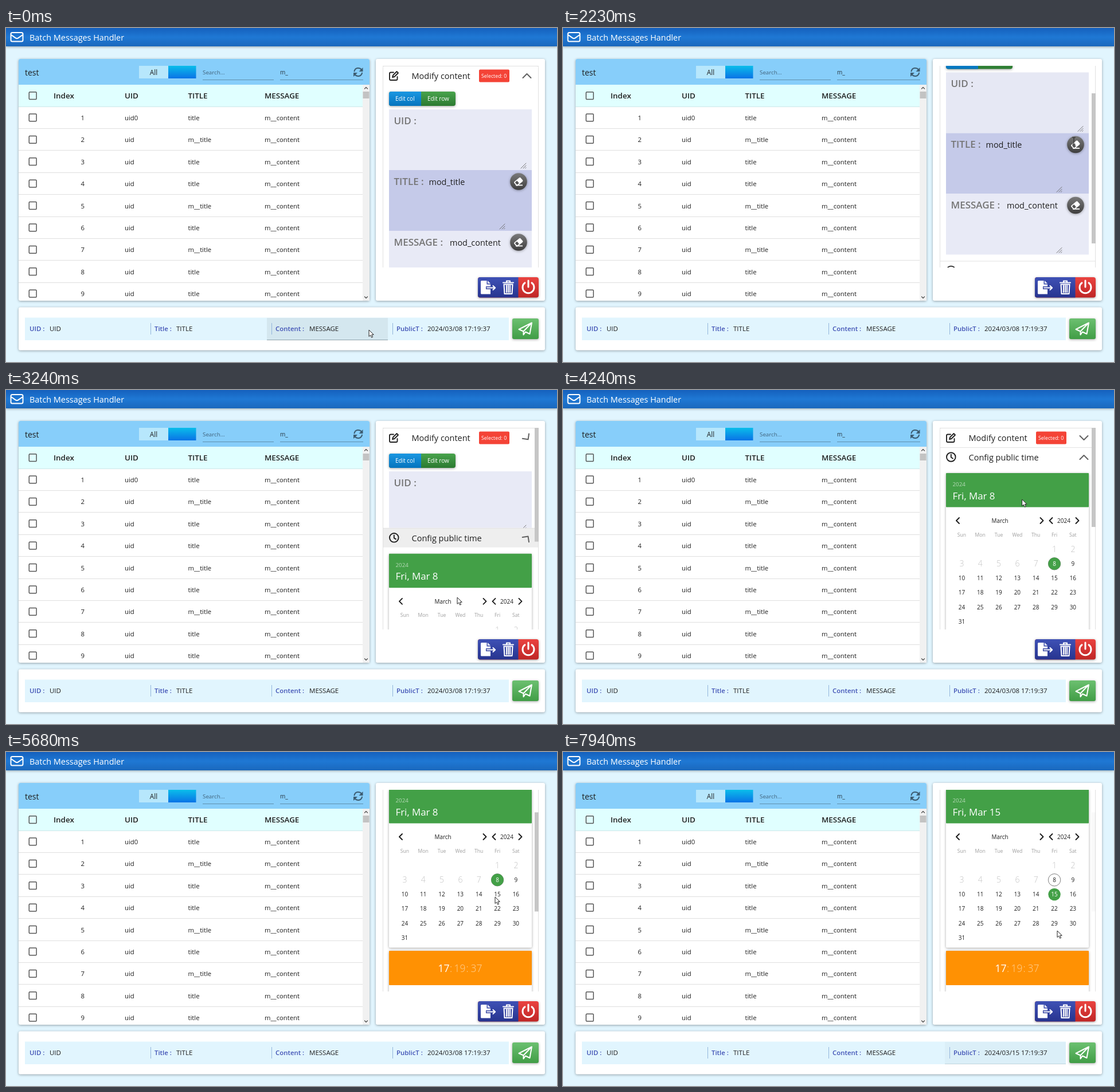
Animation, 961 px wide and 583 px high, one loop 8000 ms. Source, as an HTML page:

```html
<!DOCTYPE html>
<html lang="en">
<head>
<meta charset="utf-8">
<title>Batch Messages Handler</title>
<style>
  html, body { margin: 0; width: 100%; height: 100%; overflow: hidden; background: #e1f5fe; }
  svg { display: block; width: 100%; height: 100%; font-family: "Open Sans", "Noto Sans", sans-serif; }
  text { white-space: pre; }
  .card { filter: drop-shadow(0 1px 2px rgba(0, 0, 0, .35)); }
  .line { fill: none; stroke-linecap: round; stroke-linejoin: round; }
</style>
</head>
<body>
<svg id="stage" viewBox="0 0 961 583"></svg>
<script>
const LOOP = 8000, OPEN_AT = 3120, PICK_AT = 6300;
const MOD_H = 371, CFG_H = 614, VIEW_H = 352;

// --- markup helpers ---
const rect = (x, y, w, h, fill, more = '') =>
  `<rect x="${x}" y="${y}" width="${w}" height="${h}" fill="${fill}" ${more}/>`;
const text = (x, y, s, size, fill = '#1f1f1f', more = '') =>
  `<text x="${x}" y="${y}" font-size="${size}" fill="${fill}" ${more}>${s}</text>`;
const line = (d, stroke, w = 1, more = '') =>
  `<path class="line" d="${d}" stroke="${stroke}" stroke-width="${w}" ${more}/>`;
const group = (more, ...parts) => `<g ${more}>${parts.join('')}</g>`;
const grad = (id, ...cols) => `<linearGradient id="${id}" x2="0" y2="1">${cols.map((c, i) =>
  `<stop offset="${i / (cols.length - 1)}" stop-color="${c}"/>`).join('')}</linearGradient>`;
const clip = (id, x, y, w, h) =>
  `<clipPath id="${id}">${rect(x, y, w, h, '#000', `id="${id}Box"`)}</clipPath>`;
const MID = 'text-anchor="middle"', SEMI = 'font-weight="600"';

const defs = '<defs>' +
  grad('bar', '#1560bd', '#1f78d4', '#1a68bd') + grad('cyan', '#0abdea', '#0a73e6') +
  grad('blue', '#1a97e2', '#0574bd') + grad('green', '#48a34c', '#2c7a31') +
  grad('send', '#6cc070', '#419d46') + grad('indigo', '#3f51b5', '#27348f') +
  grad('red', '#ea4340', '#bf2626') + grad('grey', '#7a7a7a', '#3e3e3e') +
  clip('view', 657, 66, 273, VIEW_H) + clip('modClip', 657, 100, 273, MOD_H) +
  clip('cfgClip', 657, 134, 273, 0) + '</defs>';

// --- top bar ---
const topBar = group('class="card"', rect(0, 0, 961, 32, 'url(#bar)')) +
  line('M11 8H27Q29.5 8 29.5 10.5V21Q29.5 23.5 27 23.5H11Q8.500 23.500 8.500 21V10.500Q8.500 8 11 8ZM9 12L17 17.600Q19 18.800 21 17.600L29 12', '#fff', 2) +
  text(41, 21.5, 'Batch Messages Handler', 14.4, '#fff');

// --- table ---
const checkbox = y => rect(40.3, y - 6.3, 12.8, 12.8, 'none', 'rx="1.2" stroke="#555" stroke-width="1.5"');
const row = (_, i) => {
  const y = 161 + 38.4 * i, n = i + 1;
  return checkbox(y - 4.7) + text(133.8, y, n, 11.3, '#1f1f1f', MID) +
    text(207, y, i ? 'uid' : 'uid0', 11.3) +
    text(317.5, y, [2, 5, 7].includes(n) ? 'm__title' : 'title', 11.3) +
    text(451, y, 'm__content', 11.3) +
    (i < 8 ? rect(22, Math.round(y + 14), 600, 1, '#dfdfdf') : '');
};
const heads = [[83, 'Index'], [207, 'UID'], [317.5, 'TITLE'], [451, 'MESSAGE']];
const table = group('class="card"', rect(22, 54, 612, 422, '#fff', 'rx="3"')) +
  `<path d="M22 99V57Q22 54 25 54H631Q634 54 634 57V99Z" fill="#87cefa"/>` +
  text(33, 83, 'test', 14) +
  rect(232, 66, 51, 22, '#b7e7fc') + text(257.5, 81.5, 'All', 11.8, '#1f1f1f', MID) +
  rect(283, 66, 48.5, 22, 'url(#cyan)') +
  text(343, 81, 'Search...', 9.8, '#41647c') + text(478, 81, 'm_', 10, '#26333c') +
  rect(343, 90, 124, 1, '#5f90ae') + rect(478, 90, 145, 1, '#5f90ae') +
  line('M607.500 75.500A7 7 0 0 1 620 72.800M621 78.500A7 7 0 0 1 608.500 81.200', '#3d5d72', 2) +
  `<path d="M622.500 69V76H615.500ZM606 85V78H613Z" fill="#3d5d72"/>` +
  rect(22, 99, 600, 38, '#e0ffff') + rect(22, 137, 600, 1, '#cfe6e8') +
  checkbox(118) + heads.map(([x, s]) => text(x, 123.3, s, 13.4, '#1f1f1f', SEMI)).join('') +
  Array.from({ length: 9 }, row).join('') +
  rect(622, 99, 12, 377, '#f1f1f1') + rect(622.5, 111, 11, 12, '#c3c3c3') +
  line('M625.500 106L628 103.500L630.500 106M625.500 469L628 471.500L630.500 469', '#505050', 1.3);

// --- bottom form ---
const fields = [[41, 'UID :', 76, 'UID'], [259, 'Title :', 297, 'TITLE'],
  [470, 'Content :', 529, 'MESSAGE'], [681, 'PublicT :', 735, '']];
const hoverField = (id, x, w) => group(`id="${id}"`,
  rect(x, 506, w, 39, '#000', 'opacity=".06"'), rect(x, 544, w, 1, '#8fa3ad'));
const form = group('class="card"', rect(22, 487.5, 918, 75, '#fff', 'rx="3"')) +
  rect(33, 505.500, 844, 39.500, '#e1f5fe') +
  hoverField('contentHover', 455, 211) + hoverField('timeHover', 666, 211) +
  fields.map(([x, label, vx, v], i) =>
    (i ? rect(x - 7, 515, 1, 20, '#93b6dc') : '') +
    text(x, 529, label, 11.4, '#3f51b5', SEMI) +
    text(vx, 529, v, 11.5, '#1f1f1f', i == 3 ? 'id="stamp"' : '')).join('') +
  group('class="card"', rect(883, 507, 46, 36, 'url(#send)', 'rx="3"')) +
  line('M894.500 526L917 514.500L913.500 534L906 530.500L902.500 535.500V529.500ZM902.500 529.500L916.500 515', '#fff', 2);

// --- right side ---
const chevron = (id, y) => group(`id="${id}"`, line(`M901.500 ${y - 3.500}L908.500 ${y + 3.500}L915.500 ${y - 3.500}`, '#606060', 2));
const header = (id, y, label, icon) =>
  rect(657, y, 272, 34, '#fff') + rect(657, y, 272, 34, '#000', `id="${id}Hover" opacity="0"`) +
  rect(657, y, 272, 1, '#e2e2e2') + icon + text(707.5, y + 23.3, label, 14.5) + chevron(id + 'Arrow', y + 17.5);

const grip = (x, y) => line(`M${x - 5} ${y + 4}L${x + 4} ${y - 5}M${x - 1} ${y + 4}L${x + 4} ${y - 1}M${x + 2.500} ${y + 4}L${x + 4} ${y + 2.500}`, '#666', .9);
const eraser = y => group('class="card"', `<circle cx="894" cy="${y}" r="14.800" fill="url(#grey)"/>`) +
  group(`transform="translate(894 ${y}) rotate(-40)"`, rect(-7.5, -4.5, 14.5, 9, '#fff', 'rx="1.8"'),
    rect(-5.8, -2.8, 4.7, 5.6, '#555', 'rx=".8"')) + rect(889, y + 5.5, 12, 1.8, '#fff');
const area = (y, fill, id, label, gx, vx, v) => rect(668, y, 249, 106, fill) +
  rect(668, y, 249, 106, '#333300', `id="${id}" opacity="0"`) +
  text(676.5, y + 26, label, 17, '#757575', SEMI) + grip(gx, y + 99) +
  (v ? text(vx, y + 25.7, v, 14.4) + eraser(y + 20) : '');

const editIcon = line('M676 77.500H671Q669 77.500 669 79.500V89Q669 91 671 91H680.500Q682.500 91 682.500 89V85M674 86L675 82.500L681.500 76L684 78.500L677.500 85Z', '#222', 1.9);
const clockIcon = line('M669 117a7.800 7.800 0 1 0 15.600 0a7.800 7.800 0 1 0 -15.600 0M676.800 112.500V117.500L680 119.500', '#1c1c1c', 1.9);
const tagIcon = '<path d="M668.500 111H675L682 118L676 124L668.500 117Z" fill="#1c1c1c"/><circle cx="671.500" cy="113.800" r="1.200" fill="#fff"/>' +
  line('M679 111.500L685 117.800L680 123.500', '#1c1c1c', 1.700);

const modBody = group('clip-path="url(#modClip)"',
  rect(657, 100, 272, MOD_H, '#fff'),
  group('class="card"', rect(668, 111, 116, 25, 'url(#green)', 'rx="4"'),
    '<path d="M724 111V136H672Q668 136 668 132V115Q668 111 672 111Z" fill="url(#blue)"/>'),
  text(679, 127.3, 'Edit col', 10, '#fff'), text(735, 127.3, 'Edit row', 10, '#fff'),
  area(142, '#e8eaf6', 'uidHover', 'UID :', 903),
  area(248, '#c5cae9', 'titleHover', 'TITLE :', 866, 737.5, 'mod_title'),
  area(354, '#e8eaf6', 'msgHover', 'MESSAGE :', 866, 774, 'mod_content'));

const dayPos = n => ({ x: 695.4 + 32.33 * ((n + 4) % 7), y: 278 + 25.3 * Math.floor((n + 4) / 7) });
const day = n => {
  const { x, y } = dayPos(n), old = n < 8, size = old ? 14 : 10;
  return text(x, y + size * .357, n, size, old ? '#c2c2c2' : '#1f1f1f',
    `${MID} id="day${n}" ${old ? 'font-weight="300"' : ''}`);
};
const disc = (id, fill, more = '') => `<circle id="${id}" r="10.700" fill="${fill}" ${more}/>`;
const nav = (x, d) => line(`M${x - 2.500 * d} 223L${x + 2.500 * d} 228L${x - 2.500 * d} 233`, '#1c1c1c', 1.9);
const cfgBody = group('clip-path="url(#cfgClip)"',
  rect(657, 134, 272, CFG_H, '#fff'),
  group('class="card"', rect(668, 145, 249, 276.5, '#fff', 'rx="2"'), rect(668, 427, 249, 310, '#fff', 'rx="2"')),
  rect(668, 145, 249, 59.5, '#43a047', 'rx="1"'), rect(668, 427, 249, 60, '#ff9103', 'rx="1"'),
  text(679.5, 168, '2024', 9.8, '#fff', 'opacity=".6"'), text(679.5, 190.500, '', 16.9, '#fff', 'id="title"'),
  nav(688.5, -1), nav(835, 1), nav(851, -1), nav(897, 1),
  text(762, 232, 'March', 9.9, '#1f1f1f', MID), text(873.5, 232, '2024', 10, '#1f1f1f', MID),
  ['Sun', 'Mon', 'Tue', 'Wed', 'Thu', 'Fri', 'Sat'].map((s, i) =>
    text(695.4 + 32.33 * i, 255.5, s, 8.6, '#9e9e9e', MID)).join(''),
  disc('over', '#ededed'), disc('ring', 'none', 'stroke="#7d7d7d"'), disc('chosen', '#43a047'),
  Array.from({ length: 31 }, (_, i) => day(i + 1)).join(''),
  text(753.500, 463.500, '17<tspan fill-opacity=".6" font-weight="300"><tspan x="774">:</tspan><tspan x="781.500">19</tspan><tspan x="802.500">:</tspan><tspan x="810.500">37</tspan></tspan>', 17.5, '#fff'));

const actions = group('class="card"', rect(823, 435, 106, 35.500, 'url(#red)', 'rx="4"'),
    '<path d="M893.500 435V470.500H827Q823 470.500 823 466.500V439Q823 435 827 435Z" fill="url(#indigo)"/>') +
  '<path d="M829.500 441H838.500V447.500H845V451H837V456H845V464.500H829.500Q828 464.500 828 463V442.500Q828 441 829.500 441ZM840 441L845 446H840Z" fill="#fff"/>' +
  line('M839 453.500H852.500M849.500 450L853.200 453.500L849.500 457', '#fff', 2) +
  line('M867 444.500H885M873 443V441.500H879V443M868.500 447.500L869.500 464H882.500L883.500 447.500ZM873 449.500V461.500M876 449.500V461.500M879 449.500V461.500', '#fff', 2.1) +
  line('M905 444.800A10 10 0 1 0 917 444.800M911 441V452', '#fff', 3);

const side = group('class="card"', rect(645, 54, 295, 422, '#fff', 'rx="3"')) +
  group('clip-path="url(#view)"',
    group('id="scroll"',
      header('mod', 66, 'Modify content', editIcon),
      rect(825, 72.500, 53, 22, '#f44336', 'rx="2"'), text(829, 87, 'Selected: 0', 8.8, '#fff'),
      modBody,
      group('id="cfg"', header('cfg', 100, 'Config public time', clockIcon), cfgBody),
      group('id="map"', header('map', 100, 'Map column to mail field', tagIcon)),
      rect(657.5, 66.5, 271, 100, 'none', 'id="frame" rx="2" stroke="#e0e0e0"')),
    rect(922, 66, 7, 100, '#c6c6c6', 'id="thumb"')) + actions;

// --- pointer ---
const BW = 'fill="#fff" stroke="#222" stroke-linejoin="round"';
const pointer = group('id="pointer"',
  `<path id="arrow" d="M0 0V11.500L2.700 9L4.600 13.200L6.600 12.400L4.800 8.300H8.300Z" ${BW}/>`,
  `<path id="hand" d="M-1.300 9V1.200Q0 -.600 1.300 1.200V5.500Q3 4.700 3.700 6Q5.200 5.200 6 6.600Q7.800 6.200 8 8V11.500L6.700 15.500H.300L-4 10Q-4.200 8 -2.500 8.400Z" ${BW}/>`,
  line('M-2.500 -6H-1Q0 -6 0 -5V5Q0 6 -1 6H-2.500M2.500 -6H1Q0 -6 0 -5M0 5Q0 6 1 6H2.500', '#222', 1, 'id="beam"'));

const stage = document.getElementById('stage');
stage.innerHTML = defs + topBar + table + side + form + pointer;
const el = {};
stage.querySelectorAll('[id]').forEach(n => el[n.id] = n);
const set = (id, attrs) => { for (const k in attrs) el[id].setAttribute(k, attrs[k]); };

// --- motion ---
const clamp = v => Math.max(0, Math.min(1, v));
const part = (t, a, b) => clamp((t - a) / (b - a));
const smooth = v => v * v * (3 - 2 * v);
const fade = (t, on, off, len = 300) => Math.min(part(t, on, on + len), 1 - part(t, off, off + len));
function bezier(x, x1, y1, x2, y2) {
  const at = (u, a, b) => 3 * a * u * (1 - u) ** 2 + 3 * b * u * u * (1 - u) + u ** 3;
  let lo = 0, hi = 1;
  for (let i = 0; i < 20; i++) {
    const u = (lo + hi) / 2;
    at(u, x1, x2) < x ? lo = u : hi = u;
  }
  return at(lo, y1, y2);
}

// time, x, y
const path = [[0, 633, 527], [390, 633, 527], [700, 668, 405], [1140, 815, 92], [1220, 821, 106],
  [1500, 852, 258], [1810, 888, 193], [2020, 891, 197], [2300, 891, 197], [2720, 787, 362],
  [3450, 787, 362], [3780, 797, 274], [4240, 801, 191], [4480, 712, 186], [4590, 741, 202],
  [4660, 742, 204], [4800, 751, 251], [5120, 751, 251], [5410, 849, 256], [5610, 851, 254],
  [5680, 853, 253], [6340, 853, 253], [6700, 800, 470], [7040, 790, 546], [7110, 788, 542],
  [7600, 792, 530], [7880, 835, 355], [7940, 862, 312], [LOOP, 862, 312]];
function pointerAt(t) {
  const i = path.findIndex(k => k[0] > t), [a, x, y] = path[i - 1], [b, x2, y2] = path[i];
  const k = part(t, a, b);
  return [x + (x2 - x) * k, y + (y2 - y) * k];
}

function draw(t) {
  const step = part(t, OPEN_AT, OPEN_AT + 300);
  const open = bezier(step, .4, 0, .2, 1), turn = bezier(step, .25, .8, .5, 1);
  const modH = MOD_H * (1 - open), cfgH = CFG_H * open, total = 102 + modH + cfgH;
  const scroll = t < 4900 ? Math.max(0, 121 * smooth(part(t, 2090, 2360)) - MOD_H * open)
    : 80 * smooth(part(t, 5020, 5240));
  const cfgTop = 100 + modH;

  set('scroll', { transform: `translate(0 ${-scroll})` });
  set('cfg', { transform: `translate(0 ${modH})` });
  set('map', { transform: `translate(0 ${34 + modH + cfgH})` });
  set('modClipBox', { height: modH });
  set('cfgClipBox', { height: cfgH });
  set('frame', { height: total - 1 });
  set('modArrow', { transform: `rotate(${-180 * (1 - turn)} 908.5 83.5)` });
  set('cfgArrow', { transform: `rotate(${-180 * turn} 908.5 117.5)` });
  set('thumb', { y: 66 + scroll * VIEW_H / total, height: VIEW_H * VIEW_H / total,
    opacity: t < 7000 ? fade(t, 650, 6480) : .1 * part(t, 7860, 7940) });

  set('modHover', { opacity: .1 * fade(t, 1050, 1200, 150) });
  set('cfgHover', { opacity: .1 * fade(t, 2500, 3140) });
  set('uidHover', { opacity: .035 * fade(t, 1270, 2120, 150) });
  set('titleHover', { opacity: .035 * fade(t, 1450, 1540, 100) });
  set('contentHover', { opacity: 1 - part(t, 450, 750) });
  set('timeHover', { opacity: fade(t, 6760, 7760) });

  const [x, y] = pointerAt(t), cy = y + scroll;
  const inside = x > 657 && x < 929 && y > 66 && y < 418;
  const over = (top, h) => inside && cy >= top && cy < top + h;
  let hot = 0;
  for (let n = 8; n <= 31 && open == 1 && inside; n++) {
    const p = dayPos(n);
    if (Math.hypot(p.x - x, p.y - cy) < 10.7) hot = n;
  }
  const onHeader = over(66, 34) || over(cfgTop, 34) || over(cfgTop + 34 + cfgH, 34);
  const kind = onHeader || hot ? 'hand' : modH == MOD_H && x > 668 && x < 917 && over(142, 318) ? 'beam' : 'arrow';
  for (const k of ['arrow', 'hand', 'beam']) set(k, { visibility: k == kind ? 'visible' : 'hidden' });
  set('pointer', { transform: `translate(${x} ${y})` });

  const picked = t >= PICK_AT ? 15 : 8;
  const place = (id, n) => { const p = dayPos(n); set(id, { cx: p.x, cy: p.y }); };
  place('over', hot || 8);
  place('ring', 8);
  place('chosen', picked);
  set('over', { opacity: hot ? 1 : 0 });
  for (const n of [8, 15]) set('day' + n, { fill: n == picked ? '#fff' : '#1f1f1f' });
  el.title.textContent = 'Fri, Mar ' + picked;
  set('title', { opacity: picked == 8 ? 1 : part(t, PICK_AT - 60, PICK_AT + 240) });
  el.stamp.textContent = `2024/03/${String(picked).padStart(2, '0')} 17:19:37`;
}

const start = performance.now();
function tick() {
  draw((performance.now() - start) % LOOP);
  requestAnimationFrame(tick);
}
tick();
</script>
</body>
</html>
```
